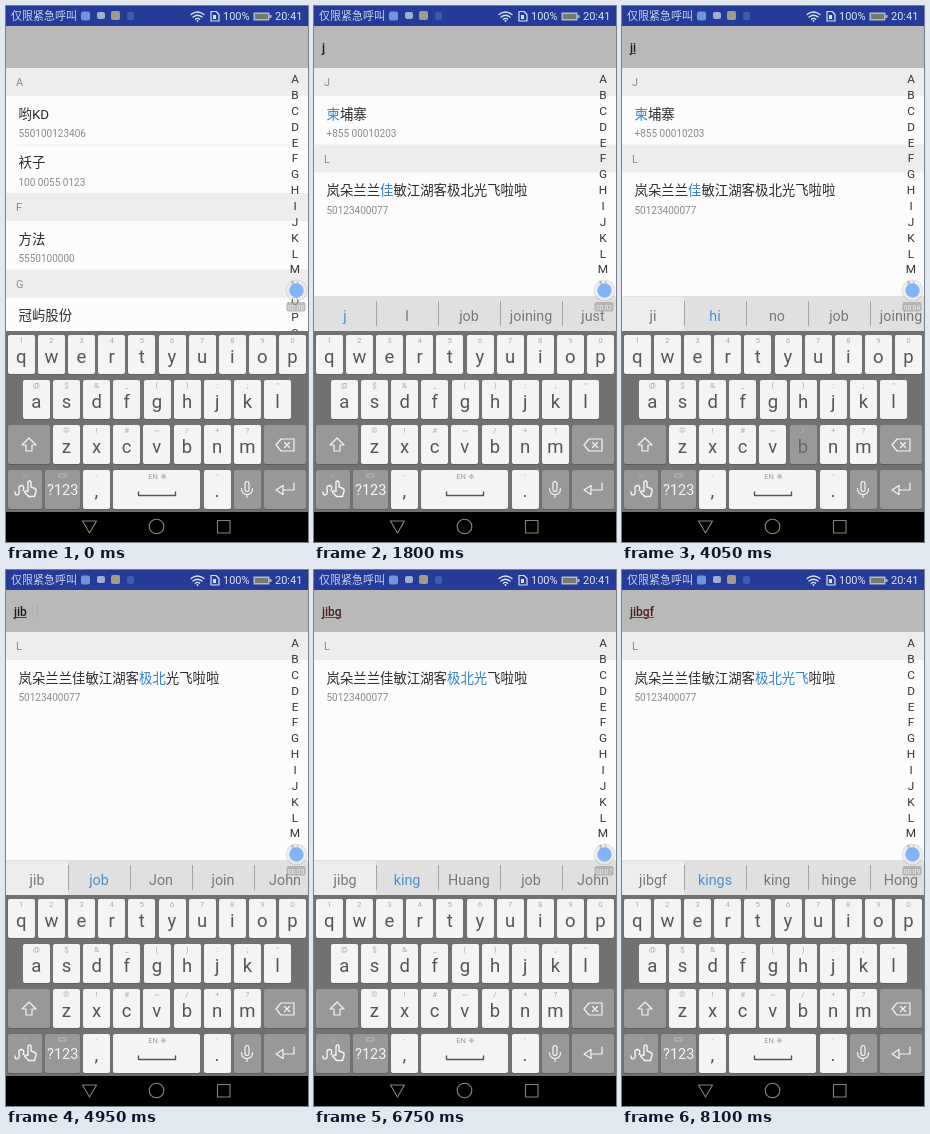
An HTML page with a canvas for the animation above (8550 ms loop, 302 px wide and 536 px high).

```html
<!DOCTYPE html>
<html lang="zh">
<head>
<meta charset="utf-8">
<title>Contact search</title>
<style>
html, body { margin: 0; width: 100%; height: 100%; overflow: hidden; background: #000; }
canvas { display: block; width: 302px; height: 536px; }
</style>
</head>
<body>
<canvas id="stage"></canvas>
<script>
const W = 302, H = 536, LOOP = 8550, STEP = 450;
const FONT = 'Roboto, "Noto Sans CJK SC", "Noto Sans CJK", sans-serif';
const canvas = document.getElementById('stage');
const ctx = canvas.getContext('2d');
const dpr = window.devicePixelRatio || 1;
canvas.width = W * dpr;
canvas.height = H * dpr;
ctx.scale(dpr, dpr);

const BLUE = '#2f80d0';

// Helpers
function rect(x, y, w, h, color) {
  ctx.fillStyle = color;
  ctx.fillRect(x, y, w, h);
}
function round(x, y, w, h, r, color) {
  ctx.fillStyle = color;
  ctx.beginPath();
  ctx.roundRect(x, y, w, h, r);
  ctx.fill();
}
function disc(x, y, r, color) {
  ctx.fillStyle = color;
  ctx.beginPath();
  ctx.arc(x, y, r, 0, Math.PI * 2);
  ctx.fill();
}
function text(s, x, y, size, color, align = 'left', weight = 400) {
  ctx.font = `${weight} ${size}px ${FONT}`;
  ctx.textAlign = align;
  ctx.fillStyle = color;
  ctx.fillText(s, x, y);
  return ctx.measureText(s).width;
}
function line(d, color, width = 1) {
  ctx.lineWidth = width;
  ctx.lineCap = ctx.lineJoin = 'round';
  ctx.strokeStyle = color;
  ctx.stroke(new Path2D(d));
}

// Contacts: text before the match, match, text after it, number
const LONG = ['岚朵兰兰佳敏江湖客极北光飞啦啦', '50123400077'];
const longRow = (from, to) =>
  [LONG[0].slice(0, from), LONG[0].slice(from, to), LONG[0].slice(to), LONG[1]];
const ALL = [
  ['A'], ['哟KD', '', '', '550100123406'], ['袄子', '', '', '100 0055 0123'],
  ['F'], ['方法', '', '', '5550100000'],
  ['G'], ['冠屿股份', '', '', '']
];
const FIRST = [['J'], ['', '柬', '埔寨', '+855 00010203'], ['L'], longRow(4, 5)];

// What is shown from each typed letter on
const STATES = [
  { at: 0, typed: '', rows: ALL },
  { at: 1800, typed: 'j', rows: FIRST, words: 'j l job joining just', pick: 0, red: 2250 },
  { at: 3150, typed: 'ji', rows: FIRST, words: 'ji hi no job joining', pick: 1 },
  { at: 4500, typed: 'jib', rows: [['L'], longRow(9, 11)], words: 'jib job Jon join John', pick: 1 },
  { at: 5850, typed: 'jibg', rows: [['L'], longRow(9, 12)], words: 'jibg king Huang job John', pick: 1, red: 6300 },
  { at: 7650, typed: 'jibgf', rows: [['L'], longRow(9, 13)], words: 'jibgf kings king hinge Hong', pick: 1, red: 8100 }
];
const PRESSES = { 2700: 'i', 4050: 'b', 5400: 'g', 7200: 'f' };

function statusBar() {
  const ink = '#dce2f4';
  rect(0, 0, W, 20, '#263b98');
  text('仅限紧急呼叫', 5, 14, 11, '#c9d3f0');
  round(75, 5.5, 9, 9, 2, '#6f96da');
  round(91, 6, 8, 7, 2, '#a0acd2');
  round(105, 5, 9, 9, 2, '#a39a88');
  round(121, 6, 7, 8, 2, '#3c5cb0');
  line('M185 8.5Q191.5 3.5 198 8.5M187 11Q191.5 7.5 196 11M189.3 13.2Q191.5 11.5 193.7 13.2', ink, 1.3);
  disc(191.5, 15, 1, ink);
  line('M205 5.5h5l3 3v6.5h-8z', ink, 1.2);
  rect(207, 9, 3, 4, ink);
  text('100%', 217, 14, 11, ink);
  rect(247.5, 6.5, 16, 8, '#b4bac4');
  rect(249, 8, 13, 5, '#77796f');
  rect(263.5, 9, 2, 3, '#b4bac4');
  text('20:41', 269, 14, 11, ink);
}

function searchBar(s, t) {
  rect(0, 20, W, 42, '#b9b9b9');
  if (s.typed) {
    const red = s.red && t >= s.red;
    const w = text(s.typed, 8, 46, 12, red ? '#4a1d1d' : '#1c1c1c', 'left', 500);
    rect(8, 47, w, 1, red ? '#8a4040' : '#444');
  } else if (t >= 1350) {
    rect(8, 33, 1, 15, '#79b0a8');
  }
  if (t >= 4950 && t < 5400) {
    rect(26, 33, 1, 14, '#a2b6b7');
    rect(31, 33, 1, 14, '#8fb8bc');
  }
}

function list(rows, bottom) {
  ctx.save();
  ctx.beginPath();
  ctx.rect(0, 62, W, bottom - 62);
  ctx.clip();
  rect(0, 62, W, bottom - 62, '#fcfcfc');
  let y = 62, item = false;
  for (const row of rows) {
    if (row.length === 1) {
      rect(0, y, W, 28, '#ededed');
      text(row[0], 10, y + 18, 11, '#8c8c8c');
      y += 28;
      item = false;
    } else {
      if (item) rect(12, y, W - 12, 1, '#f0f0f0');
      let x = 12.5;
      row.slice(0, 3).forEach((part, i) => {
        x += text(part, x, y + 22.5, 13.4, i === 1 ? BLUE : '#2c2c2c');
      });
      text(row[3], 12.5, y + 41, 10, '#8a8a8a');
      y += 48.5;
      item = true;
    }
  }
  for (let i = 0; i < 26; i++) {
    text(String.fromCharCode(65 + i), 289, 77.2 + i * 15.85, 11.8, '#333', 'center');
  }
  ctx.restore();
}

function candidates(s) {
  if (!s.words) return;
  rect(0, 290, W, 35, '#e0e0e0');
  if (s.pick) rect(0, 291, 62, 34, '#ededed');
  s.words.split(' ').forEach((word, i) => {
    text(word, 31 + i * 62, 315, 14.3, i === s.pick ? '#4a8fd2' : '#777', 'center');
    if (i) rect(i * 62, 295, 1, 25, '#a5a5a5');
  });
}

function keyBox(x, y, w, color) {
  round(x, y + 1, w, 39, 2, '#606060');
  round(x, y, w, 39, 2, color);
}

function keyRow(letters, hints, x, y, pressed) {
  [...letters].forEach((c, i) => {
    const cx = x + i * 30.15, down = c === pressed;
    keyBox(Math.round(cx - 13.4), y, 27, down ? '#999' : '#f4f4f4');
    text(hints[i], cx, y + 8, 8, down ? '#b8b8b8' : '#acacac', 'center');
    text(c, cx, y + 28, 18.5, down ? '#686868' : '#555', 'center');
  });
}

function keyboard(pressed) {
  const dark = '#989898', ink = '#f4f4f4';
  rect(0, 325, W, 181, '#717171');
  keyRow('qwertyuiop', '1234567890', 15.2, 329, pressed);
  keyRow('asdfghjkl', '@$&_():;"', 30.3, 374, pressed);
  keyRow('zxcvbnm', '©!#~/+?', 60.4, 419, pressed);

  keyBox(2, 419, 42, dark);
  line('M23 432l-7 7h4v6h6v-6h4z', ink, 1.2);
  keyBox(258, 419, 42, dark);
  line('M270 439l5-6h13v12h-13zM278.5 436.5l5 5m0-5l-5 5', ink, 1.2);

  const y = 464;
  keyBox(2, y, 34, dark);
  line('M9 486q0 4 3 2.5q2-1 1-5t3-4q3 1 1 5M22 485v-9q1.5-2 3 0v5l4 1.5q1.5.5 1 3l-1.5 5h-6l-4-4.5q0-2 3.5-.5', ink, 1.4);
  text('☼', 19, y + 8, 7, '#c2c2c2', 'center');
  keyBox(39, y, 35, dark);
  line('M53 468h7v3h-7z', '#c8c8c8', .7);
  text('?123', 56.7, y + 25, 14.5, ink, 'center');
  keyBox(77, y, 27, '#f4f4f4');
  text('-', 90.4, y + 8, 8, '#acacac', 'center');
  text(',', 90.4, y + 27, 19, '#555', 'center');
  keyBox(107, y, 87, '#f4f4f4');
  text('EN', 147, y + 9, 7.5, '#9c9c9c', 'center');
  line('M155.5 470.5a2 2 0 1 0 4 0a2 2 0 1 0-4 0h4m-2-2v4', '#a5a5a5', .6);
  line('M132.5 486v3.5h37v-3.5', '#555', 1.4);
  keyBox(198, y, 27, '#f4f4f4');
  text("'", 211, y + 9, 8, '#acacac', 'center');
  text('.', 211, y + 27, 19, '#555', 'center');
  keyBox(228, y, 27, dark);
  line('M239 478q0-2.5 2-2.5t2 2.5v5q0 2.5-2 2.5t-2-2.5zM235.5 482.5q0 6 5.5 6t5.5-6M241 488.5v3', ink, 1.2);
  keyBox(258, y, 42, dark);
  line('M288 477v7h-11m0-4.5v9l-7-4.5z', ink, 1.2);
}

function navBar() {
  rect(0, 506, W, 30, '#000');
  line('M76.5 515h14l-7 12z', '#858585', 1.1);
  line('M143.2 520.5a7.3 7.3 0 1 0 14.6 0a7.3 7.3 0 1 0-14.6 0', '#858585', 1.1);
  line('M211.5 514.5h12.5v12.5h-12.5z', '#858585', 1.1);
}

function recorder(t) {
  disc(290.5, 284.5, 10.8, 'rgba(160,160,160,.35)');
  disc(290.5, 284.5, 10, 'rgba(250,251,253,.6)');
  disc(290.5, 284.5, 7.2, 'rgba(116,172,248,.88)');
  round(280.5, 296, 19, 9.5, 2, 'rgba(165,165,165,.75)');
  text('00:0' + Math.floor(t / 900), 290, 303.5, 6.5, '#f2f2f2', 'center');
}

function draw(now) {
  const t = Math.floor(now % LOOP / STEP) * STEP;
  const s = STATES.filter(state => state.at <= t).pop();
  statusBar();
  searchBar(s, t);
  list(s.rows, s.words ? 290 : 325);
  candidates(s);
  keyboard(PRESSES[t]);
  navBar();
  recorder(t);
  requestAnimationFrame(draw);
}
requestAnimationFrame(draw);
</script>
</body>
</html>
```
